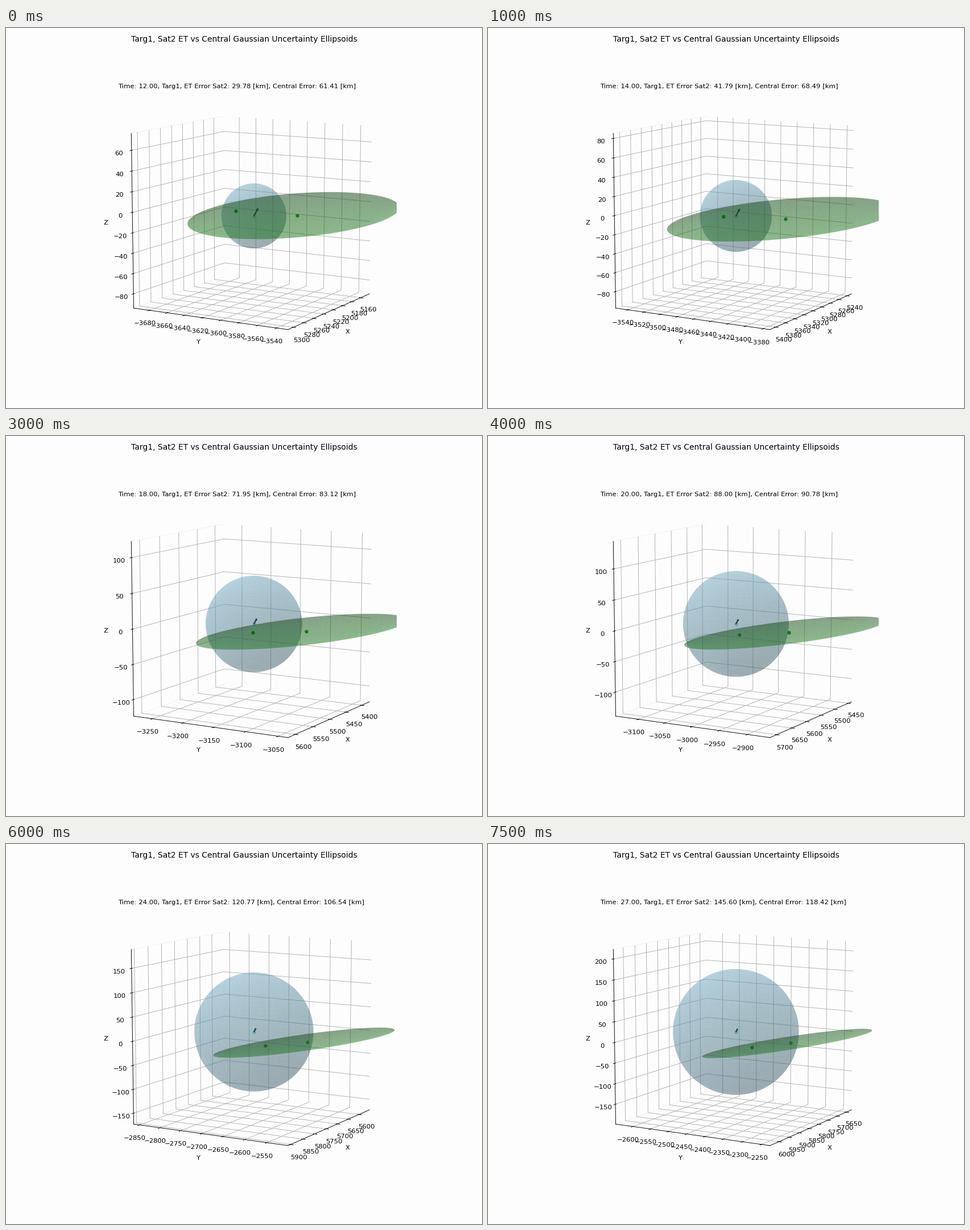
These frames come from a looping animation (837 px wide and 669 px high, 8000 ms). A matplotlib script:

```python
import numpy as np
import matplotlib.pyplot as plt
from matplotlib.animation import FuncAnimation
from matplotlib.ticker import MaxNLocator

W, H, DPI = 837, 669, 83.7
ELEV, AZIM = 10, 30
FRAMES, INTERVAL = 16, 500
START = 12

plt.rcParams["font.family"] = "DejaVu Sans"
plt.rcParams["font.size"] = 9.97
plt.rcParams["axes.formatter.useoffset"] = False


def through(times, values):
    """Smooth curve through a few readings."""
    mid = np.mean(times)
    fit = np.polyfit(np.array(times) - mid, values, len(times) - 1)
    return lambda t: np.polyval(fit, t - mid)


READINGS = (12, 14, 16, 18, 22, 24, 27)
et_error = through(READINGS, (29.78, 41.79, 56.36, 71.95, 104.32, 120.77, 145.60))
central_error = through(READINGS, (61.41, 68.49, 75.72, 83.12, 98.64, 106.54, 118.42))

# Screen directions expressed in data space
e, a = np.radians([ELEV, AZIM])
RIGHT = np.array([-np.sin(a), np.cos(a), 0])
UP = np.array([-np.sin(e) * np.cos(a), -np.sin(e) * np.sin(a), np.cos(e)])
NEAR = np.cross(RIGHT, UP)

u = np.linspace(0, 2 * np.pi, 49)
v = np.linspace(0, np.pi, 41)
BALL = np.array([
    np.outer(np.cos(u), np.sin(v)),
    np.outer(np.sin(u), np.sin(v)),
    np.outer(np.ones_like(u), np.cos(v)),
])

fig = plt.figure(figsize=((W + 1e-6) / DPI, (H + 1e-6) / DPI), dpi=DPI,
                 facecolor="#fdfdfd")
ax = fig.add_subplot(projection="3d", computed_zorder=False)
ax.set_facecolor("none")
ax.view_init(elev=ELEV, azim=AZIM)
ax.set_box_aspect((1, 1, 1))
fig.suptitle("Targ1, Sat2 ET vs Central Gaussian Uncertainty Ellipsoids")
label = ax.text2D(0.05, 0.95, "", transform=ax.transAxes)
ax.set_xlabel("X")
ax.set_ylabel("Y")
ax.set_zlabel("Z")
for axis, edge in ((ax.xaxis, "none"), (ax.yaxis, "#ebebeb"), (ax.zaxis, "none")):
    axis.pane.fill = False
    axis.pane.set_edgecolor(edge)

locator = MaxNLocator(nbins=9, steps=[1, 2, 2.5, 5, 10])
artists = []


def ellipsoid(pos, axes, color, zorder):
    x, y, z = np.tensordot(axes, BALL, 1) + pos[:, None, None]
    surface = ax.plot_surface(x, y, z, color=color, alpha=0.3, rstride=1,
                              cstride=1, linewidth=0, antialiased=True,
                              zorder=zorder)
    surface.set_snap(False)
    artists.append(surface)


def dot(pos, color, zorder):
    artists.append(ax.scatter(*pos[:, None], color=color, s=20,
                              depthshade=False, zorder=zorder))


def set_view(mid, half):
    setters = ((ax.set_xlim, ax.set_xticks), (ax.set_ylim, ax.set_yticks),
               (ax.set_zlim, ax.set_zticks))
    for c, (set_lim, set_ticks) in zip(mid, setters):
        ticks = locator.tick_values(c - half, c + half)
        set_ticks(ticks[np.abs(ticks - c) <= half])
        pad = half * 25 / 24
        set_lim(c - pad, c + pad)


def update(i):
    while artists:
        artists.pop().remove()

    # Curved orbit, with a local error sphere that grows almost linearly
    mid = np.array([5225 + 48.7 * i - 0.554 * i**2,
                    -3613.2 + 74.18 * i + 0.275 * i**2,
                    -9 + 1.4 * i])
    radius = 2.4 + 9.8 * np.hypot(i, 3)
    truth = (mid + (-17.7 + 1.97 * i + 0.12 * i**2) * RIGHT
             + (4.7 - 2.8 * i) * UP)
    fused = (mid + (42.1 + 4.78 * i + 0.084 * i**2) * RIGHT
             + (0.6 - 1.82 * i) * UP)

    dot(fused, "forestgreen", 2)
    dot(mid, "skyblue", 2)
    arrow = 3.9 * RIGHT + 7.2 * UP
    artists.append(ax.quiver(*mid, *arrow, color="black", linewidth=2,
                             arrow_length_ratio=0.3, zorder=3))
    ellipsoid(mid, radius * np.eye(3), "skyblue", 4)
    dot(truth, "green", 5 if i < 8 else 3)

    # Mirrored axes turn the normals inward, so the underside is the bright one
    thick = 21.6 - 0.37 * i
    long_axis = ((105 + 8.45 * i - 0.097 * i**2) * RIGHT
                 + (8 + 1.2 * i + 0.02 * i**2) * UP
                 - (50 + 7 * i) * NEAR)
    ellipsoid(fused, np.column_stack([thick * NEAR, thick * UP, long_axis]),
              "forestgreen", 6)

    set_view(mid, radius + 50)
    t = START + i
    label.set_text(f"Time: {t:.2f}, Targ1, ET Error Sat2: {et_error(t):.2f} [km], "
                   f"Central Error: {central_error(t):.2f} [km]")
    return artists


anim = FuncAnimation(fig, update, frames=FRAMES, interval=INTERVAL,
                     init_func=lambda: [], repeat=True, repeat_delay=0)
plt.show()
```
